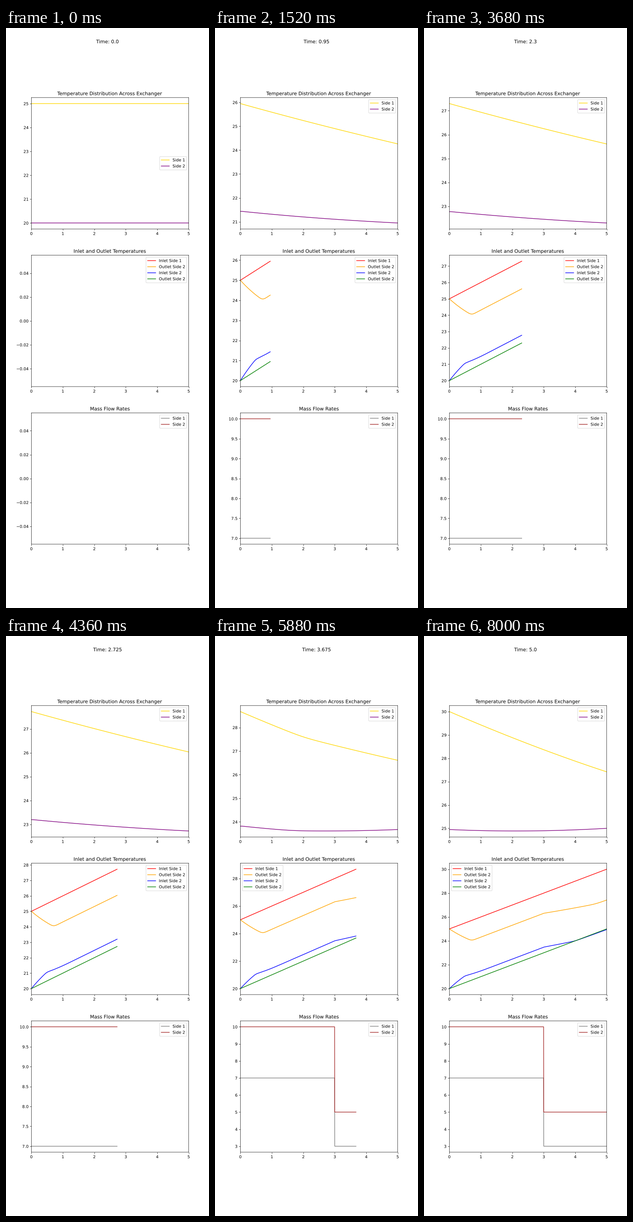
These frames come from a looping animation (443x1265 px, 9600 ms). A matplotlib script:

```python
import numpy as np
import matplotlib.pyplot as plt
from matplotlib import patheffects
from matplotlib.animation import FuncAnimation

WIDTH, HEIGHT, DPI = 443, 1265, 63.25
INTERVAL = 40            # ms
RUN, HOLD = 200, 39      # moving frames after the first, then a still end
SUB = 20                 # solver steps per frame
DT = 0.025 / SUB
LENGTH, CELLS = 5.0, 100
TRANSFER = 0.05          # heat exchange per unit length
T_SWITCH = 3.0

# Place lines and glyph outlines at sub-pixel positions.
plt.rcParams.update({
    "path.snap": False,
    "path.effects": [patheffects.Normal()],
    "legend.labelspacing": 0.484,
})


def simulate():
    """Counter-flow exchanger: upwind advection plus heat exchange."""
    dx = LENGTH / CELLS
    steps = RUN * SUB
    time = np.arange(steps + 1) * DT
    late = np.arange(steps + 1) >= round(T_SWITCH / DT)
    flow1 = np.where(late, 3.0, 7.0)
    flow2 = np.where(late, 5.0, 10.0)
    side1 = np.full((steps + 1, CELLS + 1), 25.0)
    side2 = np.full((steps + 1, CELLS + 1), 20.0)
    for n in range(steps):
        a, b = side1[n], side2[n]
        heat = TRANSFER * (a - b)
        side1[n + 1, 1:] = a[1:] - DT * flow1[n] * (np.diff(a) / dx + heat[1:])
        side2[n + 1, :-1] = b[:-1] + DT * flow2[n] * (np.diff(b) / dx + heat[:-1])
        side1[n + 1, 0] = 25 + time[n + 1]
        side2[n + 1, -1] = 20 + time[n + 1]
        side2[n + 1, 0] = side2[n + 1, 1]
    return time, side1, side2, flow1, flow2


time, side1, side2, flow1, flow2 = simulate()
x = np.linspace(0, LENGTH, CELLS + 1)

fig, axes = plt.subplots(3, 1, figsize=(WIDTH / DPI, HEIGHT / DPI), dpi=DPI)
caption = fig.suptitle("Time: 0.0")


def make_lines(ax, title, entries):
    ax.set_title(title)
    lines = [ax.plot([], [], color=color, label=label)[0]
             for label, color in entries]
    ax.set_xlim(0, LENGTH)
    ax.legend(loc="best")
    return lines


profiles = make_lines(axes[0], "Temperature Distribution Across Exchanger",
                      [("Side 1", "gold"), ("Side 2", "purple")])
ends = make_lines(axes[1], "Inlet and Outlet Temperatures",
                  [("Inlet Side 1", "red"), ("Outlet Side 2", "orange"),
                   ("Inlet Side 2", "blue"), ("Outlet Side 2", "green")])
flows = make_lines(axes[2], "Mass Flow Rates",
                   [("Side 1", "gray"), ("Side 2", "brown")])

histories = list(zip(ends + flows,
                     [side1[:, 0], side1[:, -1], side2[:, 0], side2[:, -1],
                      flow1, flow2]))


def update(frame):
    k = min(frame, RUN)
    n = k * SUB
    caption.set_text(f"Time: {round(k * 0.025, 3)}")
    profiles[0].set_data(x, side1[n])
    profiles[1].set_data(x, side2[n])
    # the history plots start out empty
    past = slice(0, n + 1 if k else 0, 4)
    for line, values in histories:
        line.set_data(time[past], values[past])
    for ax in axes:
        ax.relim()
        ax.autoscale_view(scalex=False)
    return []


anim = FuncAnimation(fig, update, frames=RUN + HOLD + 1, interval=INTERVAL,
                     init_func=lambda: update(0), repeat=True, repeat_delay=0,
                     blit=False)
plt.show()
```
